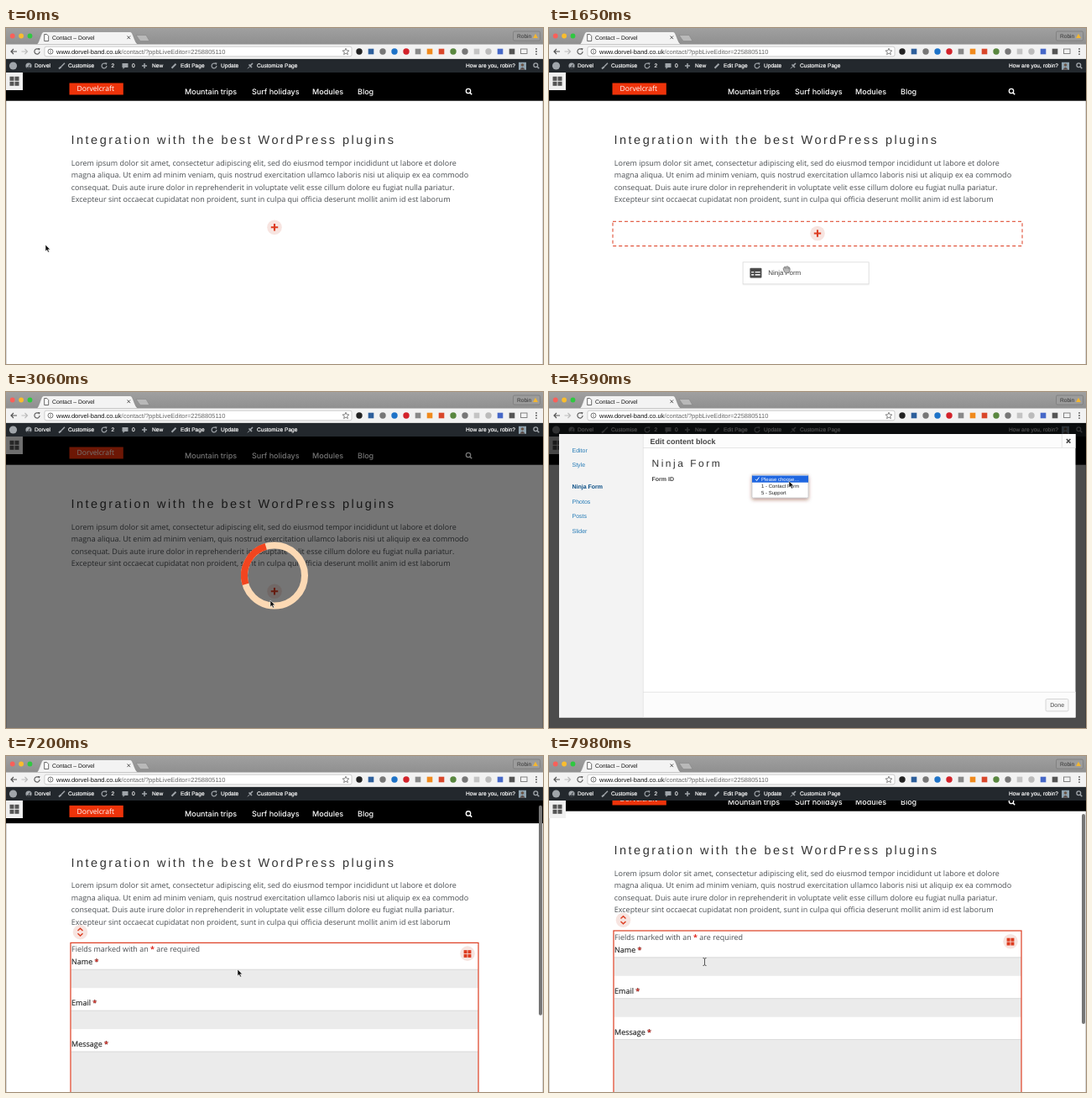
Animation, 640 px wide and 400 px high, one loop 8000 ms. Source, as an HTML page:

```html
<!DOCTYPE html>
<html lang="en">
<head>
<meta charset="utf-8">
<title>Live editor demo</title>
<style>
html, body { margin: 0; width: 100%; height: 100%; overflow: hidden; background: #fff; }
svg { display: block; width: 640px; height: 400px; }
text { font-family: "Liberation Sans", Arial, sans-serif; text-rendering: geometricPrecision; white-space: pre; }
.open { font-family: "Open Sans", sans-serif; }
.nav { font-family: Inter, sans-serif; font-weight: 500; }
.bold { font-weight: 700; }
.head { letter-spacing: 2.5px; }
.label { stroke: #222; stroke-width: .15px; }
.bar { stroke: #fff; stroke-width: .18px; }
</style>
</head>
<body>
<svg id="stage" viewBox="0 0 640 400"></svg>
<script>
const LOOP = 8000;
const RED = '#dd3c20';
const BODY = '#4a4e52';
const $ = id => document.getElementById(id);

// ---- markup helpers
const text = (x, y, s, size, fill, cls = '', more = '') =>
  `<text x="${x}" y="${y}" font-size="${size}" fill="${fill}" class="${cls}" ${more}>${s}</text>`;
const rect = (x, y, w, h, fill, more = '') =>
  `<rect x="${x}" y="${y}" width="${w}" height="${h}" fill="${fill}" ${more}/>`;
const dot = (x, y, r, fill, more = '') =>
  `<circle cx="${x}" cy="${y}" r="${r}" fill="${fill}" ${more}/>`;
const line = (d, stroke, w = 1, more = '') =>
  `<path d="${d}" fill="none" stroke="${stroke}" stroke-width="${w}" ${more}/>`;
const group = (id, body, more = '') => `<g id="${id}" ${more}>${body}</g>`;
const squares = (x, y, size, gap, fill) =>
  [0, 1, 2, 3].map(i => rect(x + (i % 2) * (size + gap), y + (i >> 1) * (size + gap), size, size, fill)).join('');
const lens = (x, y, r, c) =>
  dot(x, y, r, 'none', `stroke="${c}" stroke-width="1.3"`) + line(`M${x + r * .7} ${y + r * .7}l2.3 2.3`, c, 1.5);
const spin = (x, y, r, c, w = 1) =>
  line(`M${x + r} ${y}A${r} ${r} 0 1 1 ${x + r * .5} ${y - r * .87}`, c, w) +
  `<path d="M${x + r * .2} ${y - r * 1.3}l3 .3-1 2.6z" fill="${c}"/>`;

function chrome() {
  const lights = ['#f9605a', '#f9bd2e', '#2fc840'].map((c, i) => dot(7.7 + i * 10.4, 9.5, 2.9, c)).join('');
  const icons = [
    ['c', '#222'], ['s', '#2d5f9b'], ['c', '#777'], ['c', '#1e73c8'], ['c', '#d3222a'],
    ['s', '#888'], ['s', '#f08a1d'], ['s', '#d9472b'], ['c', '#59873f'], ['c', '#777'],
    ['s', '#c4c4c4'], ['c', '#bbb'], ['s', '#4668c8'], ['s', '#555']
  ].map(([k, c], i) => {
    const x = 421 + i * 14;
    return k === 'c' ? dot(x, 28, 3.7, c) : rect(x - 3.3, 24.7, 6.6, 6.6, c);
  }).join('');
  return rect(0, 0, 640, 20, 'url(#strip)') + lights +
    `<path d="M36 19.5C40 19 41 4.5 45 4.5H148C152 4.5 153 19 158 19.5Z" fill="#f3f3f3" stroke="#858585" stroke-width=".6"/>` +
    `<path d="M155 8.5H167L171 15.5H160Z" fill="#b9b9b9" stroke="#858585" stroke-width=".6"/>` +
    rect(0, 19.5, 640, 17.5, '#f2f2f2') + line('M0 36.7H640', '#b5b5b5', .6) +
    `<path d="M45.7 7.5h3l2 2v6h-5z" fill="#fff" stroke="#444" stroke-width=".8"/>` +
    text(55, 14, 'Contact – Dorvel', 6.8, '#111') +
    line('M144.5 9.5l3.6 3.6m0-3.6l-3.6 3.6', '#444', .9) +
    rect(604.5, 4, 32, 11, '#9c9c9c', 'rx="1.5" stroke="#777" stroke-width=".7"') +
    text(609, 12, 'Robin', 6.6, '#333') + '<path d="M631 6.7l3 5.4h-6z" fill="#f2b632"/>' +
    line('M13 28H6m3-3l-3 3 3 3', '#555', 1.2) + line('M18.5 28h7m-3-3l3 3-3 3', '#bbb', 1.2) +
    spin(37, 28, 3.1, '#555', 1.1) +
    rect(46, 22.2, 366, 11.6, '#fff', 'rx="2" stroke="#b9b9b9" stroke-width=".7"') +
    dot(53, 28, 3, 'none', 'stroke="#555" stroke-width=".8"') + line('M53 27.5v2.2M53 26v.8', '#555', .8) +
    text(60, 30.5, 'www.dorvel-band.co.uk<tspan fill="#666">/contact/?ppbLiveEditor=2258805110</tspan>', 7.5, '#111') +
    line('M405 24.2l1.1 2.6 2.8.2-2.2 1.8.7 2.8-2.4-1.5-2.4 1.5.7-2.8-2.2-1.8 2.8-.2z', '#666', .8) +
    icons + rect(613.5, 25, 7.5, 5.5, 'none', 'stroke="#777" stroke-width=".9"') +
    [24.9, 28, 31.1].map(y => dot(632, y, .95, '#555')).join('');
}

function adminBar() {
  const g = '#a0a5aa', w = '#fff';
  const items = [[34, 'Dorvel'], [74, 'Customise'], [125.5, '2'], [150, '0'], [174, 'New'],
    [208, 'Edit Page'], [256, 'Update'], [299, 'Customize Page'], [548, 'How are you, robin?']];
  return rect(0, 37, 640, 16, '#23282d') + dot(8.5, 45, 4.6, g) +
    dot(27, 45, 3.6, g) + line('M27 46l1.5-2.5', '#23282d') + rect(24.5, 46.6, 5, 2, '#23282d') +
    line('M63 48.5l3-2.5', g, 2) + line('M66 45.7l4-4', g, 1.4) +
    spin(117, 45, 2.9, g, 1.2) +
    `<path d="M138.5 42h7v5h-4l-2 2v-2h-1z" fill="${g}"/>` +
    line('M165 42v6M162 45h6', g, 1.5) +
    line('M197.5 47.7l5-5', g, 2) + spin(248, 45, 2.9, g, 1.2) +
    line('M288 48.3l3-3', g) + line('M289.5 43.5l3.5 3.5M291 45l3-3', g, 1.7) +
    items.map(([x, s]) => text(x, 47.4, s, 6.6, w, 'bar')).join('') +
    rect(611, 40.8, 9, 9, '#8fa3b0') + dot(615.5, 44, 1.8, '#6a5547') + '<path d="M612.5 49.8q3-6 6 0z" fill="#5a4c48"/>' +
    lens(631.3, 44.2, 2.4, g);
}

const badge = dot(0, 0, 8.8, '#f7e4e0');

function page() {
  const nav = [[213, 'Mountain trips'], [293, 'Surf holidays'], [365, 'Modules'], [419, 'Blog']];
  const lorem = [
    'Lorem ipsum dolor sit amet, consectetur adipiscing elit, sed do eiusmod tempor incididunt ut labore et dolore',
    'magna aliqua. Ut enim ad minim veniam, quis nostrud exercitation ullamco laboris nisi ut aliquip ex ea commodo',
    'consequat. Duis aute irure dolor in reprehenderit in voluptate velit esse cillum dolore eu fugiat nulla pariatur.',
    'Excepteur sint occaecat cupidatat non proident, sunt in culpa qui officia deserunt mollit anim id est laborum'];
  const star = `<tspan fill="#e0241b" font-weight="700">*</tspan>`;
  const field = (y, name, h) =>
    text(78, y, `${name} ${star}`, 9, '#222', 'open label') +
    rect(78, y + 6, 484.5, h, '#ebebeb') + line(`M78 ${y + 6}H562.5`, '#d2d2d2', .8);
  return rect(0, 53, 640, 33.7, '#000') + rect(75.5, 65.5, 64.3, 14, '#ee330a') +
    text(84.5, 75.4, 'Dorvelcraft', 8.6, '#fff', 'open') +
    nav.map(([x, s]) => text(x, 78.8, s, 9, '#fff', 'nav')).join('') + lens(551, 75, 2.7, '#fff') +
    text(77.5, 138.2, 'Integration with the best WordPress plugins', 14.5, '#333', 'head') +
    lorem.map((s, i) => text(77.8, 163.8 + i * 14.45, s, 9, BODY, 'open')).join('') +
    group('drop', rect(76, 230.3, 488, 29.2, 'none', `stroke="${RED}" stroke-width="1" stroke-dasharray="4 3"`)) +
    group('form', text(78, 240, `Fields marked with an ${star} are required`, 9, BODY, 'open') +
      field(254.8, 'Name', 22) + field(303.7, 'Email', 22) + field(352.6, 'Message', 95)) +
    group('hover', rect(77, 229, 486, 30, 'none', `id="outline" stroke="${RED}" stroke-width="1.2"`) +
      `<g transform="translate(88.5 216.2)">${badge}${line('M-3-1.7l3-2.8 3 2.8M-3 1.7l3 2.8 3-2.8', RED, 1.4)}</g>` +
      `<g transform="translate(550 241.7)">${badge}${squares(-4.4, -4, 4, .8, RED)}</g>`) +
    group('plus', badge + line('M0-4.2v8.4M-4.2 0h8.4', RED, 2.1));
}

const card = name =>
  rect(0, 0, 150, 26, '#fff', 'stroke="#dcdcdc" stroke-width=".8" filter="url(#soft)"') +
  rect(8.3, 7, 14, 11.6, '#4a4a4a', 'rx="1"') +
  line('M10 11.8h3M10 15h3M14.5 11.8h6M14.5 15h6', '#fff', 1.4) +
  text(30, 15.7, name, 8, '#444');

const panel = () => rect(0, 53, 190, 347, '#f4f4f4', 'stroke="#ccc" stroke-width=".6"') +
  ['Heading', 'Text', 'Button', 'Video', 'Photos', 'Posts', 'Slider', 'Ninja Form']
    .map((s, i) => `<g transform="translate(20 ${83 + i * 34})">${card(s)}</g>`).join('');

const loader = () => rect(0, 53, 640, 347, '#000', 'opacity=".54"') +
  dot(320, 218.5, 36, 'none', 'stroke="#fcd9b4" stroke-width="8"') +
  line('M294.5 193A36 36 0 0 1 345.5 193', '#f2451f', 8, 'id="arc"');

function modal() {
  const tabs = [[71.5, 'Editor'], [89, 'Style'], [115, 'Ninja Form'], [132.5, 'Photos'], [150, 'Posts'], [167.5, 'Slider']];
  const options = ['Please choose…', '1 - Contact Form', '5 - Support'];
  return rect(0, 37, 640, 363, '#000', 'opacity=".7"') +
    rect(12, 50, 615.5, 337.5, '#fff') + rect(12, 50, 100, 337.5, '#f3f3f3') +
    rect(112, 50, 515.5, 16.5, '#fcfcfc') + rect(112, 357, 515.5, 30.5, '#fcfcfc') +
    line('M112.3 50V387.5M112 66.5H627.5M112 357.3H627.5M611.3 50V66.5', '#ddd', .7) +
    tabs.map(([y, s]) => s === 'Ninja Form' ? text(27.5, y, s, 7, '#0b4f86', 'bold') : text(27.5, y, s, 7, '#2279b5')).join('') +
    text(120.5, 61.5, 'Edit content block', 9, '#444', 'bold') +
    line('M616.8 56l4.6 4.6m0-4.6l-4.6 4.6', '#444', 1.5) +
    text(122.5, 88.7, 'Ninja Form', 12, '#333', 'head') + text(122.5, 106.3, 'Form ID', 7, '#444', 'bold') +
    rect(592, 365.5, 27, 14.5, '#f7f7f7', 'rx="1.5" stroke="#ccc" stroke-width=".8"') +
    text(597.3, 375.3, 'Done', 7, '#444') +
    rect(242, 98, 67, 11, '#fff', 'stroke="#ddd" stroke-width=".7"') +
    text(246, 105.7, options[0], 6, '#444', '', 'id="choice"') + line('M303 102.5l1.6 1.7 1.6-1.7', '#666', .8) +
    group('menu', rect(242, 98.5, 67, 27.5, '#fff', 'rx="1.5" stroke="#bbb" stroke-width=".6" filter="url(#glow)"') +
      rect(242, 99.5, 67, 8.2, '#1f66e0', 'id="mark"') +
      options.map((s, i) => text(253, 105.7 + i * 8, s, 6, '#222', 'opt')).join('') +
      line('M246.2 103.8l1.4 1.7 2.8-4', '#fff', 1, 'id="check"'));
}

const cursor = () =>
  group('arrow', '<path d="M0 0V7.8L1.8 6.2 3.1 9 4.5 8.4 3.2 5.7H5.7Z" fill="#111" stroke="#fff" stroke-width=".5"/>') +
  group('hand', '<path d="M-4-1q1-3.5 3.2-2.5Q1-5 2.5-3.2 4.5-3 4 .5 3.5 4 0 4.2-3 4-4-1Z" fill="#bbb" stroke="#666" stroke-width=".7"/>' +
    line('M-1.5-2.8v2M.6-3v2M2.5-2.6v2', '#666', .6)) +
  group('beam', line('M-2-4.5q2 0 2 1.2V3.3q0 1.2-2 1.2M2-4.5q-2 0-2 1.2M0 3.3q0 1.2 2 1.2', '#444', .9));

$('stage').innerHTML = `<defs>
  <linearGradient id="strip" x2="0" y2="1"><stop stop-color="#a0a0a0"/><stop offset="1" stop-color="#8f8f8f"/></linearGradient>
  <filter id="soft"><feDropShadow dx="0" dy=".5" stdDeviation=".5" flood-opacity=".15"/></filter>
  <filter id="glow" y="-30%" height="180%"><feDropShadow dx="0" dy="2" stdDeviation="2" flood-color="#7a2a16" flood-opacity=".5"/></filter>
  <clipPath id="view"><rect y="53" width="640" height="347"/></clipPath></defs>` +
  rect(0, 0, 640, 400, '#fff') + line('M.4 53V400M639.6 53V400', '#c6c6c6', .8) +
  `<g clip-path="url(#view)">${group('page', page())}</g>` +
  group('thumb', rect(635, 0, 4, 250, '#767676', 'rx="2"')) +
  chrome() + adminBar() + group('panel', panel()) +
  rect(0, 53, 20, 21, '#f0f0f0') + squares(4.5, 57.8, 5, 1, '#555') +
  group('ghost', card('Ninja Form')) + group('loader', loader()) + group('modal', modal()) + group('cursor', cursor());

// ---- motion
const ease = {
  lin: u => u,
  out: u => 1 - (1 - u) ** 2,
  mid: u => (1 - Math.cos(Math.PI * u)) / 2
};
const ramp = (t, a, b) => Math.min(1, Math.max(0, (t - a) / (b - a)));
const between = (t, a, b) => t >= a && t < b;

// time, x, y, easing towards this point
const path = [
  [0, 47, 258], [120, 47, 258], [480, 10, 67], [800, 10, 67], [1410, 72, 330], [1440, 72, 330],
  [1650, 283, 288, 'lin'], [2070, 315, 248, 'out'], [3480, 315, 248], [3870, 288, 109],
  [3930, 286.5, 103], [3990, 286, 106], [4590, 286, 106], [4680, 287, 112], [4800, 287, 112],
  [5490, 600, 372], [5880, 600, 372], [6060, 421, 297], [6180, 421, 297], [6300, 276, 254],
  [7890, 276, 254], [7980, 185.5, 245], [LOOP, 185.5, 245]
];

function pointer(t) {
  const i = path.findIndex(k => k[0] > t);
  const [a, ax, ay] = path[i - 1], [b, bx, by, e = 'mid'] = path[i];
  const u = ease[e](ramp(t, a, b));
  return [ax + (bx - ax) * u, ay + (by - ay) * u];
}

const show = (id, on) => { $(id).style.display = on ? '' : 'none'; };
const fade = (id, o) => { show(id, o > 0); $(id).setAttribute('opacity', o); };
const move = (id, x, y) => $(id).setAttribute('transform', `translate(${x} ${y})`);

function draw(t) {
  const [x, y] = pointer(t);
  const dragging = between(t, 1440, 2280);
  const scroll = t < 7200 ? 0 : 21 - 14.5 * (1 - ramp(t, 7200, 7620)) ** 2;
  const beam = scroll > 9;

  move('cursor', x, y);
  show('hand', dragging);
  show('beam', beam);
  show('arrow', !dragging && !beam);

  const slide = ease.out(ramp(t, 620, 800)) - ramp(t, 1470, 1590);
  show('panel', slide > 0);
  move('panel', -191 * (1 - slide), 0);
  show('ghost', between(t, 1470, 2280));
  move('ghost', x - 52, y - 9);
  show('drop', between(t, 1500, 2280));

  const plusY = t < 5670 ? 237.2 + 7.3 * (ramp(t, 1490, 1500) - ramp(t, 2280, 2520)) : 275;
  show('plus', t < 6600);
  move('plus', 320, plusY);

  fade('loader', t < 3600 ? ramp(t, 2280, 2620) : 0);
  $('arc').setAttribute('transform', `rotate(${63 + (t - 2460) * 235 / 600} 320 218.5)`);

  fade('modal', ramp(t, 3480, 3600) - ramp(t, 5640, 5700));
  show('menu', between(t, 4140, 4800));
  const pick = t < 4620 ? 0 : 1;
  $('mark').setAttribute('y', 99.5 + pick * 8);
  $('check').setAttribute('stroke', pick ? '#222' : '#fff');
  document.querySelectorAll('.opt').forEach((o, i) => o.setAttribute('fill', i === pick ? '#fff' : '#222'));
  $('choice').textContent = t < 4800 ? 'Please choose…' : '1 - Contact Form';

  show('hover', t >= 6240);
  $('outline').setAttribute('height', t < 6600 ? 30 : 230);
  fade('form', ramp(t, 6570, 6690));

  move('page', 0, -scroll);
  show('thumb', t >= 7200);
  move('thumb', 0, 54 + scroll * .72);
}

function tick() {
  draw(performance.now() % LOOP);
  requestAnimationFrame(tick);
}
tick();
</script>
</body>
</html>
```
